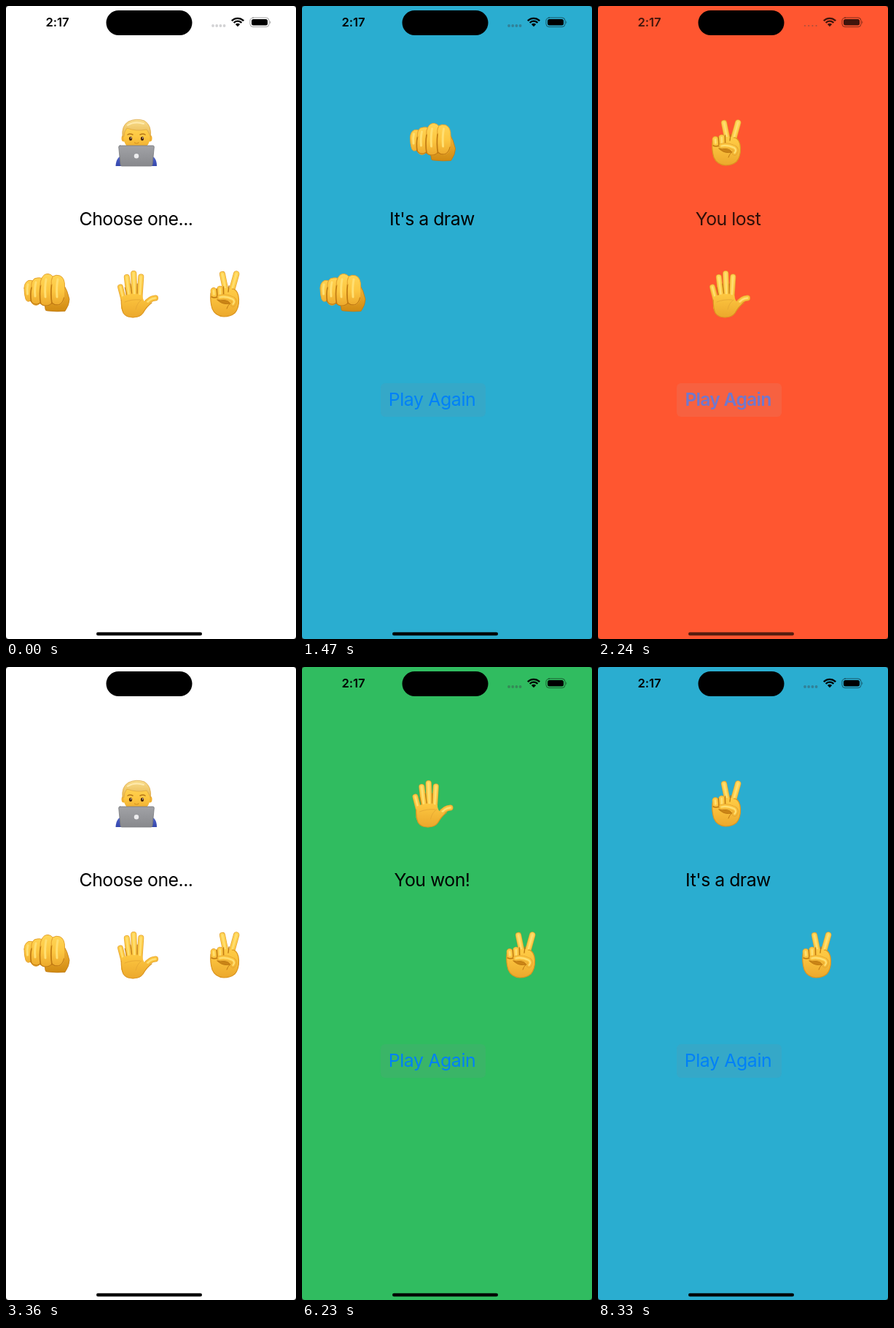
Write an HTML page with a canvas that moves like this. It is 398x866 px and loops after 8.4 s.

```html
<!DOCTYPE html>
<html lang="en">
<head>
<meta charset="utf-8">
<title>Rock Paper Scissors</title>
<style>
html, body { margin: 0; width: 100%; height: 100%; overflow: hidden; background: #fff; }
canvas { display: block; width: 398px; height: 866px; }
</style>
</head>
<body>
<canvas id="stage"></canvas>
<script>
const W = 398, H = 866, LOOP = 8400;
const canvas = document.getElementById('stage');
const ctx = canvas.getContext('2d');
const dpr = window.devicePixelRatio || 1;
canvas.width = W * dpr;
canvas.height = H * dpr;

const SKIN_EDGE = '#e5a42f', CREASE = '#c07a12', SHINE = '#ffdf72';
const BLUE = '#2aadd0', RED = '#ff5630', GREEN = '#30bc60';

// Each scene holds until the next one starts.
const scenes = [
  { at: -500 },
  { at: 280, bg: BLUE, text: "It's a draw", cpu: 'rock', you: 'rock' },
  { at: 1680 },
  { at: 2235, bg: RED, text: 'You lost', cpu: 'scissors', you: 'paper' },
  { at: 3290 },
  { at: 3845, bg: GREEN, text: 'You won!', cpu: 'paper', you: 'scissors' },
  { at: 6300 },
  { at: 7345, bg: BLUE, text: "It's a draw", cpu: 'scissors', you: 'scissors' }
];

// Shift from the player's row up to the opponent's place.
const cpuShift = { rock: [123.5, -206], paper: [-1.5, -207], scissors: [-124, -207] };

function box(x, y, w, h, r, color) {
  ctx.beginPath();
  ctx.roundRect(x, y, w, h, r);
  ctx.fillStyle = color;
  ctx.fill();
}

function dot(x, y, r, color, ry = r) {
  ctx.beginPath();
  ctx.ellipse(x, y, r, ry, 0, 0, 7);
  ctx.fillStyle = color;
  ctx.fill();
}

function shape(d, fill, edge, width = 1) {
  const p = new Path2D(d);
  if (fill) { ctx.fillStyle = fill; ctx.fill(p); }
  if (edge) { ctx.strokeStyle = edge; ctx.lineWidth = width; ctx.stroke(p); }
}

function label(text, x, y, size, weight, color, spacing) {
  ctx.font = `${weight} ${size}px Inter, Roboto, sans-serif`;
  ctx.letterSpacing = spacing + 'px';
  ctx.textAlign = 'center';
  ctx.fillStyle = color;
  ctx.fillText(text, x, y);
}

function fade(y0, y1, ...colors) {
  const g = ctx.createLinearGradient(0, y0, 0, y1);
  colors.forEach((c, i) => g.addColorStop(i / (colors.length - 1), c));
  return g;
}

const skin = (y0, y1) => fade(y0, y1, '#ffd658', '#fdc741', '#eba72b');

// A rounded limb: dark edge, skin, then a soft shine along the middle.
function limb(d, width, fill) {
  shape(d, null, SKIN_EDGE, width);
  shape(d, null, fill, width - 1.6);
  shape(d, null, SHINE, width * .3);
}

function rock() {
  shape('M53 408L54 415Q54 417 57 417Q70 418.5 81 417.5Q87 409 87 401Q84 388 79 381L66 400Z',
    fade(385, 418, '#f2b233', '#d08a12'), CREASE, .8);
  shape('M25 386Q25 378 31 375.5Q34 375 36.5 376Q38 372 43 372Q47 371.5 49 372.5Q52 366 58 366.5Q62 367 64 370Q69 367 74 369Q81 372 80.5 384Q82 398 78 405Q75 410 69 409Q65 409 63 405.5Q60 411 54 410Q49 410 47 406Q43 411 38 408.5Q35 407 34 403Q29 406 27 401Q25 395 25 386Z',
    skin(366, 411), SKIN_EDGE);
  shape('M35 385Q33 394 34.5 404M47.5 382Q45.5 394 47.5 407M62.5 381Q61 395 63 407', null, CREASE, 1.7);
  shape('M36.5 376Q34.5 379 35 385M49 373Q46.5 377 47.5 382M64 371Q61.5 375 62.5 381', null, SKIN_EDGE, 1.2);
  shape('M30 381Q28.5 387 29.5 394M41 378Q39 386 40 397M55 374Q53 384 54 398M71 374Q69 384 70 398',
    null, SHINE, 3);
  shape('M34 403Q37 409 43 408Q46 407 47 406Q50 410.5 55 410Q60 410 63 406Q67 410 73 408.5Q78 406 79.5 399',
    null, CREASE, 1.1);
}

function paper() {
  const fill = skin(362, 427);
  limb('M157 384.5L162.5 406', 7.8, fill);
  limb('M165.8 371L169.5 402', 8, fill);
  limb('M175.2 366L176.5 402', 8.2, fill);
  limb('M185.3 370.5L183.2 402', 8, fill);
  limb('M205 399.5Q197 400 192 408', 8, fill);
  shape('M158.5 398Q172 391 187.2 396Q188 402 190 404L198 407Q192 413 188 420Q183 427 172 426Q161 425 158 413Z', fill);
  shape('M158.2 402Q158 413 161 420Q165 426 174 426Q184 426 188 420Q193 411 200 406', null, '#dc9620', 1.2);
  shape('M165.5 395L163.2 385M172.7 393L170.8 380M180 393L180.2 380', null, CREASE, 1.1);
  shape('M186 402Q180 406 178 415M163 405Q172 401 184 402', null, '#e8aa34', 1);
}

function scissors() {
  const fill = skin(362, 426);
  limb('M297 367L302.5 394', 8.2, fill);
  limb('M316.2 366.5L308.5 394', 8.4, fill);
  shape('M281 393Q288 386 298 388L312 387Q319 390 319.5 401Q320 413 314 420Q308 425 299 425Q287 424 283 414Q280 405 281 393Z', fill, '#dc9620', 1.2);
  shape('M299 386L310 386L310 393L299 393Z', fill);
  limb('M285 389.5L285.5 394.5', 8.8, fill);
  limb('M293.7 387L294 395', 8.6, fill);
  shape('M289.3 387L290 399M298.5 384L298.7 394M305 391L306 383M282 398Q286 400 290 398', null, CREASE, 1.4);
  limb('M293.5 398.5Q301 396.5 311 401Q315 404 311.5 408', 7.4, fill);
  shape('M290 402Q294 403.5 299 402.5Q306 403 307.5 407Q299 409 293 404.5Z', '#c98416', CREASE, 1);
  shape('M307.5 407Q304 410 303 414', null, CREASE, 1);
}

function coder() {
  shape('M150.5 219Q151 206 161 204L197 204Q207 206 207 219Z',
    fade(204, 219, '#5367cf', '#3446ac'));
  dot(161.5, 181, 3, '#f2b02e', 4.5);
  dot(197.5, 181, 3, '#f2b02e', 4.5);
  shape('M161 176Q160 162 170 158Q179 154 189 158Q198 162 197.5 178Q198 196 179 198Q161 196 161 176Z',
    skin(160, 198));
  shape('M160 179Q158 164 168 158Q179 153 190 157Q200 163 198.5 179L196 174Q194 170 193 169Q179 172 166 167Q162 172 162 178Z',
    fade(156, 178, '#f8dc8c', '#e9b84f'), '#dba43f', .7);
  shape('M167 163Q177 157 189 161', null, '#ffebae', 2);
  shape('M167 176Q170 174 174 176M184 176Q188 174 191 176', null, '#b87718', 1.5);
  for (const x of [171, 187]) {
    dot(x, 181.5, 2.1, '#4d2810', 2.8);
    dot(x + .6, 180.5, .7, '#fff');
  }
  shape('M176.5 187Q179 189 182 187', null, '#d4921e', 1.2);
  shape('M156.5 191H201.5Q203.5 191 203.3 193L201 217Q201 219 199 219H159Q157 219 157 217L154.7 193Q154.5 191 156.5 191Z',
    fade(191, 219, '#a1a2a6', '#88898d'), '#77787c', .8);
  dot(179, 205.3, 3.2, '#ececee');
}

const draw = { rock, paper, scissors };

function statusBar(fresh, coloured) {
  const ink = fresh ? 'rgba(0,0,0,.75)' : '#000';
  label('2:17', 70.5, 28.3, 16.6, 600, ink, -.1);
  const faint = coloured ? 'rgba(60,70,75,.42)' : '#d2d2d4';
  for (let i = 0; i < 4; i++) dot(284 + i * 5.2, 27, fresh ? 1.1 : 1.9, faint);

  ctx.strokeStyle = ink;
  ctx.lineWidth = 2.3;
  ctx.lineCap = 'butt';
  for (const r of [11.2, 7.3]) {
    ctx.beginPath();
    ctx.arc(318, 28, r, -Math.PI * .76, -Math.PI * .24);
    ctx.stroke();
  }
  shape('M318 28.3L314.8 25Q318 22.4 321.2 25Z', ink);
  ctx.lineCap = 'round';

  ctx.strokeStyle = coloured ? 'rgba(0,0,0,.5)' : 'rgba(0,0,0,.36)';
  ctx.lineWidth = 1;
  ctx.beginPath();
  ctx.roundRect(335, 16, 26, 12.6, 4);
  ctx.stroke();
  box(337, 18, 22, 8.6, 2.5, ink);
  shape('M362.3 20.2Q364.4 22.2 362.3 24.4Z', 'rgba(0,0,0,.42)');
}

function corners() {
  ctx.beginPath();
  ctx.rect(0, 0, W, H);
  ctx.roundRect(0, 0, W, H, 4);
  ctx.fillStyle = '#222';
  ctx.fill('evenodd');
}

function render(t) {
  const scene = scenes.filter(s => s.at <= t).pop();
  const age = t - scene.at;
  const coloured = !!scene.bg;
  const fresh = coloured && age < 140;
  const ink = fresh ? 'rgba(0,0,0,.82)' : '#000';

  ctx.setTransform(dpr, 0, 0, dpr, 0, 0);
  ctx.lineCap = ctx.lineJoin = 'round';
  ctx.fillStyle = scene.bg || '#fff';
  ctx.fillRect(0, 0, W, H);

  // The status bar comes back a moment after a reset.
  if (coloured || age > 210) statusBar(fresh, coloured);
  box(137.5, 6, 118, 34, 17, '#000');
  box(124, 856.8, 145, 4.4, 2.2, fresh ? 'rgba(0,0,0,.66)' : '#000');

  label(scene.text || 'Choose one...', 178.5, 300, 24.8, 400, ink, -.5);

  if (coloured) {
    ctx.save();
    ctx.translate(...cpuShift[scene.cpu]);
    draw[scene.cpu]();
    ctx.restore();
    draw[scene.you]();
    box(108, 516, 144, 46, 6, fresh ? 'rgba(205,155,150,.16)' : 'rgba(125,130,145,.13)');
    label('Play Again', 178.5, 547, 24.8, fresh ? 600 : 400,
      fresh ? 'rgb(112,120,205)' : '#0080f8', fresh ? -.8 : -.35);
  } else {
    coder();
    rock();
    paper();
    scissors();
  }
  corners();
}

const start = performance.now();
function tick() {
  render((performance.now() - start) % LOOP);
  requestAnimationFrame(tick);
}
tick();
</script>
</body>
</html>
```
